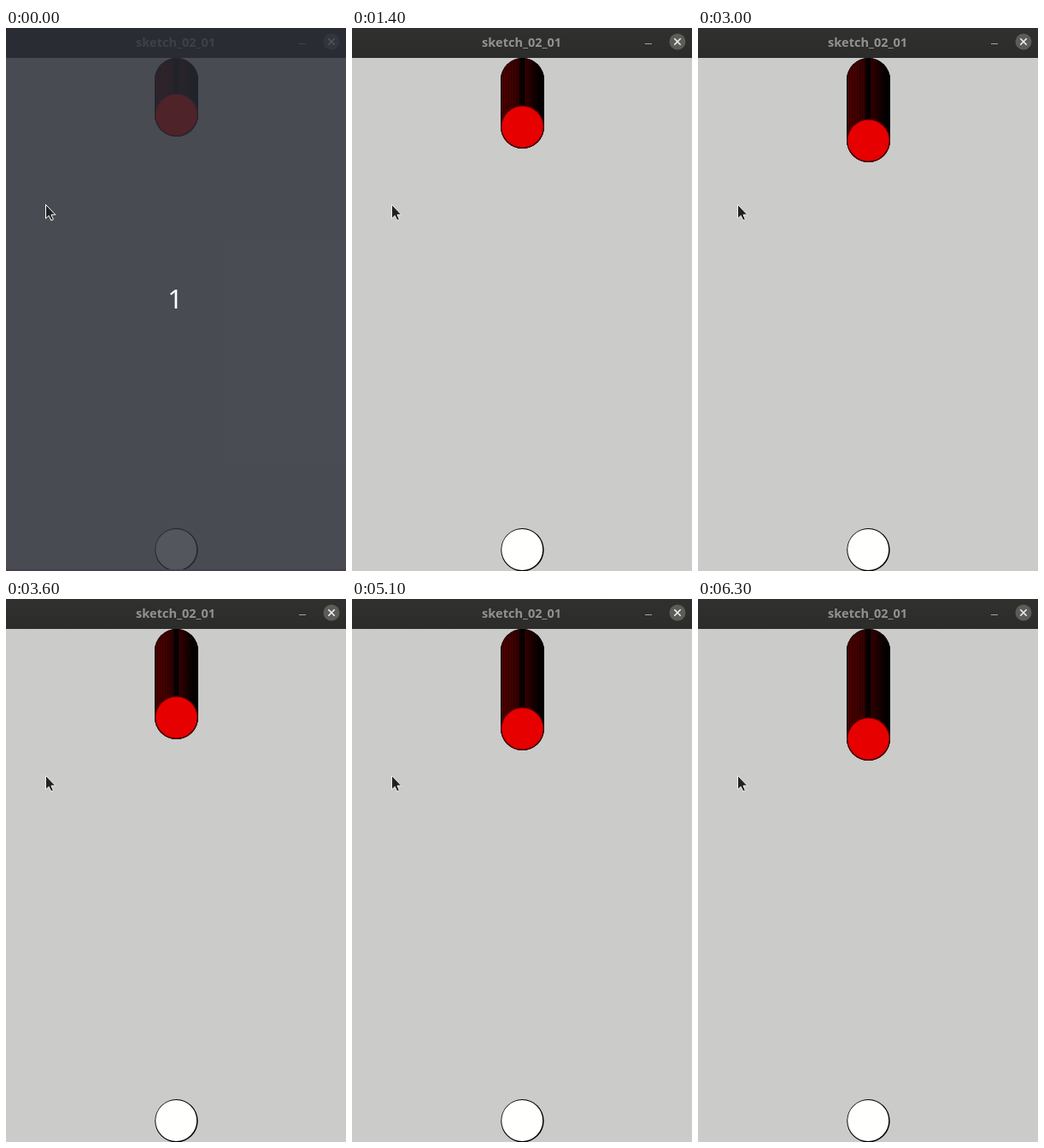
An HTML page for the animation above (6500 ms loop, 398 by 635 pixels).

```html
<!DOCTYPE html>
<html lang="en">
<head>
<meta charset="utf-8">
<style>
  html, body { margin: 0; width: 100%; height: 100%; overflow: hidden; background: #cbcbc9; }
  svg { display: block; width: 398px; height: 635px; }
  text { font-family: "Noto Sans", "Open Sans", sans-serif; text-anchor: middle; }
</style>
</head>
<body>
<svg viewBox="0 0 398 635">
  <defs>
    <linearGradient id="bar" x2="0" y2="1">
      <stop stop-color="#30302e"/>
      <stop offset="1" stop-color="#2c2c2a"/>
    </linearGradient>
    <linearGradient id="shade">
      <stop stop-color="#180000"/>
      <stop offset=".04" stop-color="#4c0000"/>
      <stop offset=".22" stop-color="#480000"/>
      <stop offset=".42" stop-color="#340000"/>
      <stop offset=".46" stop-color="#080000"/>
      <stop offset=".54" stop-color="#060000"/>
      <stop offset=".57" stop-color="#380000"/>
      <stop offset=".72" stop-color="#1e0000"/>
      <stop offset=".86" stop-color="#080000"/>
      <stop offset="1" stop-color="#000"/>
    </linearGradient>
    <clipPath id="tube"><rect class="tube" x="174" y="35" width="51" rx="25.5"/></clipPath>
  </defs>

  <rect width="398" height="635" fill="#cbcbc9"/>
  <rect width="398" height="35" fill="url(#bar)"/>
  <text x="198.5" y="22" font-size="14.5" font-weight="700" fill="#92928f">sketch_02_01</text>
  <path d="M343 18.5h8" stroke="#a3a3a0"/>
  <circle cx="381" cy="16" r="9.5" fill="#5c5c59"/>
  <path d="M377.3 12.3l7.4 7.4m0-7.4l-7.4 7.4" stroke="#f2f2f0" stroke-width="1.6"/>

  <rect class="tube" x="174" y="35" width="51" rx="25.5" fill="url(#shade)"/>
  <g id="streaks" clip-path="url(#tube)" stroke="#000" stroke-opacity=".28"></g>
  <rect class="tube" x="174" y="35" width="51" rx="25.5" fill="none" clip-path="url(#tube)" stroke="#000" stroke-width="1.6"/>
  <circle id="ball" cx="199.5" r="24.7" fill="#e60000" stroke="#4a0000" stroke-width="1.2"/>

  <circle cx="199.5" cy="610.3" r="25.2" fill="#000"/>
  <circle cx="199.2" cy="610" r="24" fill="#fffffd"/>

  <g id="dim">
    <rect width="398" height="635" fill="#282c35" fill-opacity=".8"/>
    <rect y="633" width="398" height="2" fill="#4b3d50"/>
    <text x="198" y="328" font-size="31" fill="#fff">1</text>
  </g>

  <path id="pointer" d="M46.5 206.5V222.8L50.2 219.4L52.8 225L55.4 223.9L53 218.3H57.8Z" fill="#222" stroke="#f4f4f4"/>
</svg>
<script>
  const LOOP = 6500, FRAME = 100, TOP = 35;
  const $ = id => document.getElementById(id);
  const tubes = document.querySelectorAll('.tube');

  // Runs of motion: start, end, lower edge of the ball when the run ends
  const runs = [
    [200, 200, 128], [300, 500, 132], [800, 1000, 137], [1200, 1400, 141],
    [1600, 1900, 147], [2100, 2100, 149], [2300, 2600, 153], [2800, 3400, 161],
    [3500, 3700, 165], [3900, 4100, 167], [4300, 4500, 171], [4700, 4900, 175],
    [5100, 5300, 179], [5500, 6000, 187], [6200, 6300, 189]
  ];

  // One pixel per step, holding between runs
  function lowerEdge(time) {
    let edge = 127;
    for (const [start, end, last] of runs) {
      if (time < start) break;
      edge = last - Math.max(0, end - time) / FRAME;
    }
    return edge;
  }

  let lines = '';
  for (let x = 177.5; x < 222; x += 3) {
    lines += `<path d="M${x} ${TOP}V200" stroke-width="${1 + 0.5 * Math.sin(x * 2)}"/>`;
  }
  $('streaks').innerHTML = lines;

  function draw(now) {
    const time = Math.floor((now % LOOP) / FRAME) * FRAME;
    const edge = lowerEdge(time);
    const dimmed = time < 200;
    tubes.forEach(tube => tube.setAttribute('height', edge - TOP));
    $('ball').setAttribute('cy', edge - 25.5);
    $('dim').style.display = dimmed ? '' : 'none';
    $('pointer').setAttribute('stroke', dimmed ? '#fff' : '#f0f0ee');
  }

  function tick() {
    draw(performance.now());
    requestAnimationFrame(tick);
  }
  tick();
</script>
</body>
</html>
```
